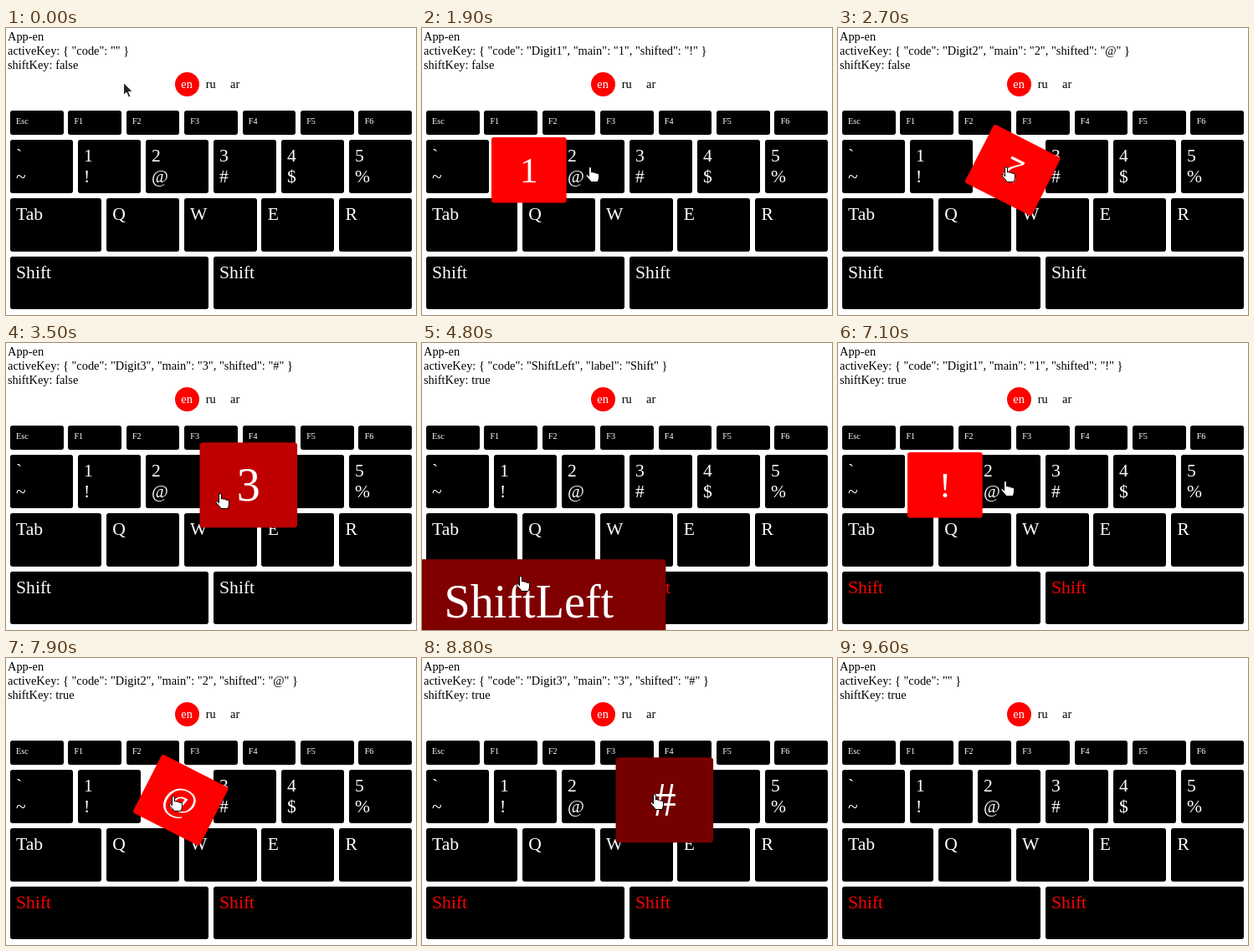
These frames come from a looping animation (490 by 344 pixels, 10 s). An HTML page:

```html
<!DOCTYPE html>
<html lang="en">
<head>
<meta charset="utf-8">
<title>Keyboard</title>
<style>
  html, body { margin: 0; width: 100%; height: 100%; overflow: hidden; background: #fff; }
  svg { display: block; width: 490px; height: 344px; font-family: "Liberation Serif", "Times New Roman", serif; }
  text { white-space: pre; fill: #000; }
  .key text, .on { fill: #fff; }
  .shifted .shift text { fill: #f00; }
</style>
</head>
<body>
<svg id="stage" viewBox="0 0 490 344">
  <g font-size="14.4">
    <text x="2" y="15">App-en</text>
    <text id="code" x="2" y="32"></text>
    <text id="state" x="2" y="49"></text>
    <circle cx="216.5" cy="67.5" r="14.5" fill="#f00"/>
    <text class="on" x="209.3" y="72">en</text>
    <text x="238.7" y="72">ru</text>
    <text x="268" y="72">ar</text>
  </g>
  <g id="keys"></g>
  <g id="active" class="key">
    <rect rx="2.9"/>
    <text font-size="43.2" text-anchor="middle" y="14.6"></text>
  </g>
  <g id="cursor">
    <path id="arrow" fill="#222" stroke="#fff" d="M.5 .5V15.5L4 12.3L6.6 18.2L9 17.2L6.5 11.4H11.2Z"/>
    <path id="hand" fill="#fff" stroke="#000" stroke-linejoin="round"
      d="M4.5 12V2Q4.5 .5 6 .5T7.5 2V7Q9 5.6 10.2 7.4Q11.8 6.4 13 8.2Q16.5 7.4 16.5 10V13Q16.5 15 15 18.5H7Q5.5 15.5 1.5 12Q.5 10 2 9.5Q3.5 9.5 4.5 12Z"/>
  </g>
</svg>
<script>
const LOOP = 10000, STEP = 100, HOLD = 1000;
const GAP = 2.88, PAD = 7.2;
const $ = id => document.getElementById(id);
const clamp = v => Math.min(1, Math.max(0, v));
const ramp = (t, a, b) => clamp((t - a) / (b - a));
const keys = {};

function add(parent, tag, attrs, text) {
  const el = document.createElementNS('http://www.w3.org/2000/svg', tag);
  for (const k in attrs) el.setAttribute(k, attrs[k]);
  if (text) el.textContent = text;
  parent.append(el);
  return el;
}

function addKey(id, x, y, w, h, size, lines, base, cls = '') {
  const g = add($('keys'), 'g', { class: 'key ' + cls });
  const left = Math.round(x + GAP), right = Math.round(x + w - GAP);
  add(g, 'rect', { x: left, y, width: right - left, height: h, rx: 2.9 });
  lines.forEach((s, i) =>
    add(g, 'text', { x: x + GAP + PAD, y: base + 25 * i, 'font-size': size }, s));
  // A pressed key drops its margin and grows by its padding.
  const bw = w - 2 * GAP + 2 * PAD, bh = 78.4;
  keys[id] = { g, bw, bh, cx: x + bw / 2, cy: y - GAP + bh / 2 };
}

['Esc', 'F1', 'F2', 'F3', 'F4', 'F5', 'F6'].forEach((s, i) =>
  addKey(s, 2 + i * 486 / 7, 99, 486 / 7, 29, 10.1, [s], 115));
['`~', '1!', '2@', '3#', '4$', '5%'].forEach((s, i) =>
  addKey(s[0], 2 + i * 81, 134, 81, 64, 21.6, [...s], 160));
addKey('Tab', 2, 204, 115.2, 64, 21.6, ['Tab'], 230);
[...'QWER'].forEach((s, i) =>
  addKey(s, 117.2 + i * 92.7, 204, 92.7, 64, 21.6, [s], 230));
['ShiftLeft', 'ShiftRight'].forEach((id, i) =>
  addKey(id, 2 + i * 243, 274, 243, 63, 21.6, ['Shift'], 300, 'shift'));

// start, key, phase offset in ms
const presses = [
  [1000, '1', 0], [2000, '2', -20], [3200, '3', 0], [4600, 'ShiftLeft', 0],
  [6200, '1', 0], [7400, '2', -20], [8600, '3', -18]
];
const upper = { 1: '!', 2: '@', 3: '#' };

// time, x, y
const path = [
  [0, 140, 65], [300, 140, 65], [400, 116, 149], [500, 116, 149], [600, 120, 183],
  [1500, 120, 183], [1900, 195, 166], [2900, 195, 166], [3200, 250, 180],
  [3900, 250, 180], [4100, 67, 300], [4200, 69, 327], [4300, 112, 279],
  [5500, 112, 279], [5600, 120, 218], [5800, 121, 176], [6600, 121, 176],
  [7000, 194, 165], [8000, 194, 165], [8300, 272, 163], [9200, 272, 163], [9500, 64, 1]
];

function describe(id) {
  if (!id) return '{ "code": "" }';
  return upper[id]
    ? `{ "code": "Digit${id}", "main": "${id}", "shifted": "${upper[id]}" }`
    : `{ "code": "${id}", "label": "Shift" }`;
}

function drawKey(press, t, shift) {
  const box = $('active');
  for (const id in keys) keys[id].g.style.display = press && press[1] === id ? 'none' : '';
  box.style.display = press ? '' : 'none';
  if (!press) return;
  const [start, id, phase] = press, k = keys[id], ms = t - start + phase;
  const scale = 1 + .3 * (ramp(ms, 0, 150) - ramp(ms, 350, 450));
  const turn = 360 * ramp(ms, 450, 850);
  box.setAttribute('transform', `translate(${k.cx} ${k.cy}) rotate(${turn}) scale(${scale})`);
  const [rect, label] = box.children;
  rect.setAttribute('x', -k.bw / 2);
  rect.setAttribute('y', -k.bh / 2);
  rect.setAttribute('width', k.bw);
  rect.setAttribute('height', k.bh);
  rect.setAttribute('fill', `rgb(${Math.round(255 * ramp(ms, 0, 400))},0,0)`);
  label.textContent = shift && upper[id] || id;
}

function drawCursor(t) {
  $('cursor').style.display = t < 9600 ? '' : 'none';
  const i = Math.max(1, path.findIndex(p => p[0] >= t));
  const [a, b] = [path[i - 1], path[i]], f = ramp(t, a[0], b[0]);
  const x = Math.round(a[1] + (b[1] - a[1]) * f), y = Math.round(a[2] + (b[2] - a[2]) * f);
  $('cursor').setAttribute('transform', `translate(${x} ${y})`);
  $('arrow').style.display = y < 95 ? '' : 'none';
  $('hand').style.display = y < 95 ? 'none' : '';
}

function draw(t) {
  const shift = t >= 4600;
  const press = presses.find(p => t >= p[0] && t < p[0] + HOLD);
  $('stage').classList.toggle('shifted', shift);
  $('code').textContent = 'activeKey: ' + describe(press && press[1]);
  $('state').textContent = 'shiftKey: ' + shift;
  drawKey(press, t, shift);
  drawCursor(t);
}

const begin = performance.now();
function tick() {
  const t = (performance.now() - begin) % LOOP;
  draw(Math.floor(t / STEP) * STEP);
  requestAnimationFrame(tick);
}
tick();
</script>
</body>
</html>
```
